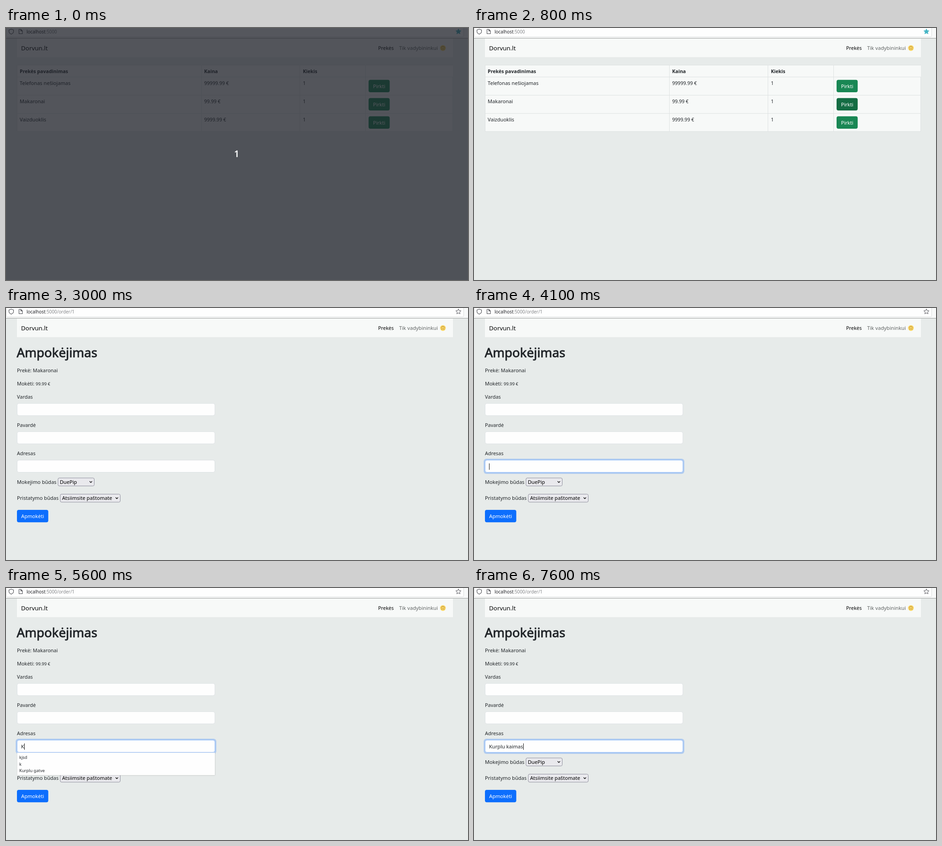
Recreate the animation shown at these times as an HTML page with a canvas. Size 1013x553 px, loop 8 s.

```html
<!DOCTYPE html>
<html lang="lt">
<head>
<meta charset="utf-8">
<title>Parduotuvė</title>
<style>
html, body { margin: 0; width: 100%; height: 100%; overflow: hidden; background: #e7ebea; }
canvas { display: block; width: 1013px; height: 553px; }
</style>
</head>
<body>
<canvas id="stage" width="1013" height="553"></canvas>
<script>
const ctx = document.getElementById('stage').getContext('2d');
const LOOP = 8000;
const INK = '#212529';
const BODY = 11.1;
const STREET = 'Kurplu gatve';

// Each entry: time, typed text, number of suggestion rows.
const typing = [
  [4300, '', 6],
  [5500, 'K', 6],
  [5600, 'K', 3],
  [5900, 'Ku', 1],
  [6100, 'Kur', 1],
  [6200, 'Kurp', 1],
  [6400, 'Kurpl', 1],
  [6600, 'Kurplu', 1],
  [6700, 'Kurplu ', 1],
  [6900, 'Kurplu k', 1],
  [7000, 'Kurplu k', 0],
  [7100, 'Kurplu ka', 0],
  [7200, 'Kurplu kai', 0],
  [7300, 'Kurplu kaim', 0],
  [7400, 'Kurplu kaima', 0],
  [7600, 'Kurplu kaimas', 0]
];
const suggestions = {
  6: ['kjsd', 'asd', 'k', 'sdf', STREET, 'dsa'],
  3: ['kjsd', 'k', STREET],
  1: [STREET]
};

function text(str, x, y, size = BODY, color = INK, weight = 400, align = 'left') {
  ctx.font = `${weight} ${size}px "Noto Sans", sans-serif`;
  ctx.textAlign = align;
  ctx.fillStyle = color;
  ctx.fillText(str, x, y);
}

// Medium weight: the regular face with a thin outline.
function mediumText(str, x, y, size, color, align = 'left') {
  text(str, x, y, size, color, 400, align);
  ctx.lineJoin = 'round';
  ctx.lineWidth = size * 0.032;
  ctx.strokeStyle = color;
  ctx.strokeText(str, x, y);
}

function rect(x, y, w, h, color) {
  ctx.fillStyle = color;
  ctx.fillRect(x, y, w, h);
}

function box(x, y, w, h, r, fill, stroke, width = 1) {
  ctx.beginPath();
  ctx.roundRect(x, y, w, h, r);
  if (fill) { ctx.fillStyle = fill; ctx.fill(); }
  if (stroke) { ctx.strokeStyle = stroke; ctx.lineWidth = width; ctx.stroke(); }
}

function line(points, color, width = 1) {
  ctx.beginPath();
  points.forEach(([x, y]) => ctx.lineTo(x, y));
  ctx.strokeStyle = color;
  ctx.lineWidth = width;
  ctx.stroke();
}

// Progress of a two-step fade that begins at the given time.
const fade = (t, start) => t < start ? 0 : t < start + 100 ? 0.5 : 1;

function star(x, y, filled) {
  ctx.beginPath();
  for (let i = 0; i < 10; i++) {
    const r = i % 2 ? 2.8 : 6;
    const a = i * Math.PI / 5 - Math.PI / 2;
    ctx.lineTo(x + r * Math.cos(a), y + r * Math.sin(a));
  }
  ctx.closePath();
  ctx.lineJoin = 'round';
  ctx.lineWidth = 1;
  ctx.strokeStyle = filled ? '#45b5c5' : '#55555c';
  ctx.fillStyle = '#45b5c5';
  if (filled) ctx.fill();
  ctx.stroke();
}

function toolbar(t) {
  rect(0, 0, 1013, 23, '#f8f9f9');
  box(0.5, -6, 1003, 25.5, 3, '#fefefe', '#dcdedd');
  rect(0, 22, 1013, 1, '#9b9d9c');

  ctx.strokeStyle = '#4a4b50';
  ctx.lineWidth = 1.1;
  ctx.stroke(new Path2D('M11.5 2.5L16.5 4.2V7.5C16.5 10.3 14.6 12.3 11.5 13.6C8.4 12.3 6.5 10.3 6.5 7.5V4.2Z'));
  ctx.stroke(new Path2D('M28.5 3H32.5L36 6.5V12.5H28.5ZM32.5 3V6.5H36'));

  const host = 'localhost';
  text(host, 45, 11.5, 9.85, '#202126');
  const hostWidth = ctx.measureText(host).width;
  text(t < 2800 ? ':5000' : ':5000/order/1', 45 + hostWidth, 11.5, 9.85, '#85878a');
  star(992, 8, t < 2800);
}

function upsideDownFace(x, y) {
  ctx.beginPath();
  ctx.arc(x, y, 6.2, 0, 7);
  ctx.fillStyle = '#f9d562';
  ctx.fill();
  ctx.beginPath();
  ctx.arc(x, y + 0.5, 3.8, Math.PI * 1.1, Math.PI * 1.9);
  ctx.strokeStyle = '#a27a3c';
  ctx.lineWidth = 1;
  ctx.stroke();
  for (const dx of [-2, 2]) {
    ctx.beginPath();
    ctx.ellipse(x + dx, y + 2, 0.8, 1.2, 0, 0, 7);
    ctx.fillStyle = '#a27a3c';
    ctx.fill();
  }
}

function navbar() {
  rect(24, 23, 956, 41, '#f7f9f8');
  text('Dorvun.lt', 33, 48.5, 13.4, '#050606');
  text('Prekės', 816, 48, 10.9, '#050606');
  text('Tik vadybininkui', 862, 48, 11.2, '#626565');
  upsideDownFace(958, 44);
}

function button(x, y, w, label, color) {
  box(x, y, w, 27.3, 4, color);
  text(label, x + w / 2, y + 18, BODY, '#fff', 400, 'center');
}

function productPage(t) {
  const border = '#dee2e2';
  rect(24, 81, 956, 146, '#f7f9f8');
  for (const y of [81.5, 107.5, 147.5, 187.5, 227]) line([[24, y], [980, y]], border);
  for (const x of [24.5, 428.5, 644.5, 788.5]) line([[x, 81], [x, 227]], border);
  line([[979.5, 107], [979.5, 227]], border);

  text('Prekės pavadinimas', 30, 98.5, 10.6, INK, 700);
  text('Kaina', 434.5, 98.5, 10.6, INK, 700);
  text('Kiekis', 651, 98.5, 10.6, INK, 700);

  const hover = fade(t, 700);
  const mix = (a, b) => a + (b - a) * hover;
  const hoverColor = `rgb(${mix(25, 20)}, ${mix(135, 108)}, ${mix(84, 67)})`;
  const products = [
    ['Telefonas nešiojamas', '99999.99 €'],
    ['Makaronai', '99.99 €'],
    ['Vaizduoklis', '9999.99 €']
  ];
  products.forEach(([name, price], i) => {
    const y = 125 + i * 40;
    text(name, 30, y);
    text(price, 434.5, y, 10.6);
    text('1', 651, y, 10.6);
    button(795, y - 11.2, 46.3, 'Pirkti', i === 1 ? hoverColor : '#198754');
  });
}

function input(y, border = '#d7dcdf') {
  box(24.4, y + 0.4, 433.6, 26.6, 4, '#fefefe', border, 0.75);
}

function select(x, y, w, label) {
  box(x + 0.5, y + 0.5, w - 1, 17.5, 3, '#e9e9ed', '#8f8f9d');
  text(label, x + 4.5, y + 13, BODY, '#000');
  const cx = x + w - 8;
  line([[cx - 2.7, y + 7.8], [cx, y + 10.5], [cx + 2.7, y + 7.8]], '#111', 1.4);
}

function addressField(t, value) {
  const focus = fade(t, 4000);
  input(333.5);
  ctx.globalAlpha = focus;
  box(21.2, 330.7, 440, 33.2, 6, 'rgba(13, 110, 253, 0.25)');
  ctx.globalAlpha = 1;
  input(333.5, focus ? '#86b7fe' : undefined);

  text(value, 33, 352);
  const blinkedOff = t >= 5200 && t < 5500;
  if (focus && !blinkedOff) {
    rect(Math.round(33 + ctx.measureText(value).width), 341, 1, 14, '#111');
  }
}

function suggestionList(t, rows) {
  if (!rows) return;
  const h = 6.5 + rows * 14.5;
  ctx.save();
  ctx.globalAlpha = fade(t, 4300);
  ctx.shadowColor = 'rgba(0, 0, 0, 0.3)';
  ctx.shadowBlur = 2;
  ctx.shadowOffsetY = 0.5;
  rect(24.5, 361.3, 433.5, h - 0.5, '#fefefe');
  ctx.shadowColor = 'transparent';
  suggestions[rows].forEach((s, i) => text(s, 29, 375 + i * 14.5, 9.3));
  ctx.restore();
}

function orderPage(t) {
  const [, value, rows] = typing.filter(([at]) => at <= t).pop() || [0, '', 0];
  mediumText('Ampokėjimas', 23.5, 108, 27.7, INK);
  text('Prekė: Makaronai', 24, 140.5, 10.95);
  text('Mokėti:', 24, 169.5, 10.95);
  text('99.99 €', 65, 169.5, 9.45);
  text('Vardas', 24, 198.5, 10.9);
  input(209);
  text('Pavardė', 24, 261, 10.9);
  input(271);
  text('Adresas', 24, 323, 10.9);
  text('Mokejimo būdas', 24, 385.5);
  select(113.5, 372.5, 80.5, 'DuePip');
  text('Pristatymo būdas', 24, 421);
  select(118.5, 408, 132.5, 'Atsiimsite paštomate');
  button(24, 443, 68.7, 'Apmokėti', '#0d6efd');
  addressField(t, value);
  suggestionList(t, rows);
}

function countdown() {
  rect(0, 0, 1013, 553, 'rgba(28, 31, 39, 0.75)');
  mediumText('1', 506, 283, 20, '#fff', 'center');
}

function draw(now) {
  const t = now % LOOP;
  rect(0, 0, 1013, 553, '#e7ebea');
  navbar();
  if (t < 3000) productPage(t);
  else orderPage(t);
  toolbar(t);
  if (t < 100) countdown();
}

const start = performance.now();
function tick() {
  draw(performance.now() - start);
  requestAnimationFrame(tick);
}
tick();
</script>
</body>
</html>
```
